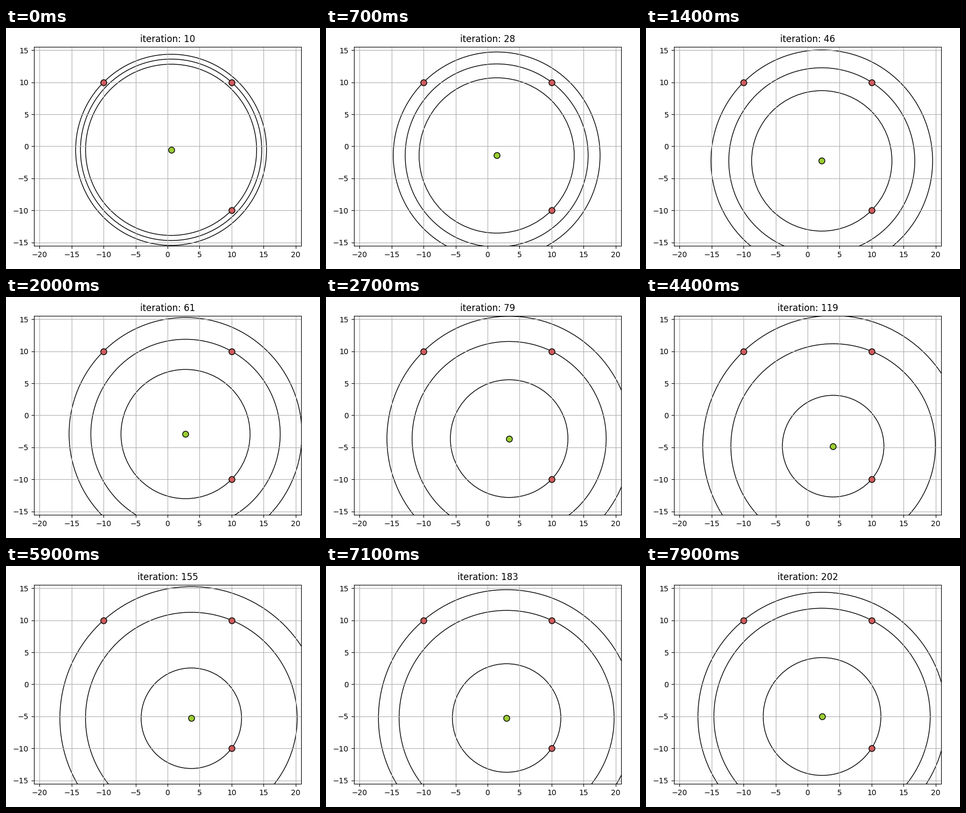
Animation of 583x447 px, one loop 8 s. Source, as a matplotlib script:

```python
import numpy as np
import matplotlib.pyplot as plt
from matplotlib.animation import FuncAnimation
from matplotlib.patches import Circle

W, H, DPI = 583, 447, 100
FRAMES, INTERVAL = 80, 100

ANCHORS = [(-10, 10), (10, 10), (10, -10)]
STEP, OMEGA = 0.05, 2 * np.pi / 500

# Iteration reached at given ticks; the pace drifts slightly.
TICKS = [0, 14, 27, 44, 59, 71, 79]
ITERATIONS = [10, 46, 79, 119, 155, 183, 202]

# The point drifts by a small cosine step per iteration on each axis.
k = np.arange(ITERATIONS[-1] + 1)
path_x = np.cumsum(STEP * np.cos(OMEGA * k))
path_y = -np.cumsum(STEP * np.cos(0.75 * OMEGA * k))

fig = plt.figure(figsize=(W / DPI, H / DPI), dpi=DPI)
ax = fig.add_axes([52 / W, 42.8 / H, 496 / W, 369.6 / H])
half_y = 1.1 * np.hypot(10, 10)
half_x = half_y * 496 / 369.6
ax.set_xlim(-half_x, half_x)
ax.set_ylim(-half_y, half_y)
ax.set_xticks(range(-20, 21, 5))
ax.set_yticks(range(-15, 16, 5))
ax.grid(True)
title = ax.set_title("")

rings = [ax.add_patch(Circle((0, 0), 1, fill=False, ec="black", lw=1))
         for _ in ANCHORS]


def dots(xs, ys, color):
    return ax.plot(xs, ys, "o", ms=8, mfc=color, mec="black", mew=1)[0]


dots(*zip(*ANCHORS), "indianred")
point = dots([0], [0], "yellowgreen")


def update(frame):
    n = int(round(np.interp(frame, TICKS, ITERATIONS)))
    x, y = path_x[n], path_y[n]
    point.set_data([x], [y])
    for ring, (ax_x, ax_y) in zip(rings, ANCHORS):
        ring.set_center((x, y))
        ring.set_radius(np.hypot(ax_x - x, ax_y - y))
    title.set_text(f"iteration: {n}")
    return [*rings, point, title]


anim = FuncAnimation(fig, update, frames=FRAMES, interval=INTERVAL,
                     repeat=True, repeat_delay=0, blit=False)
plt.show()
```
